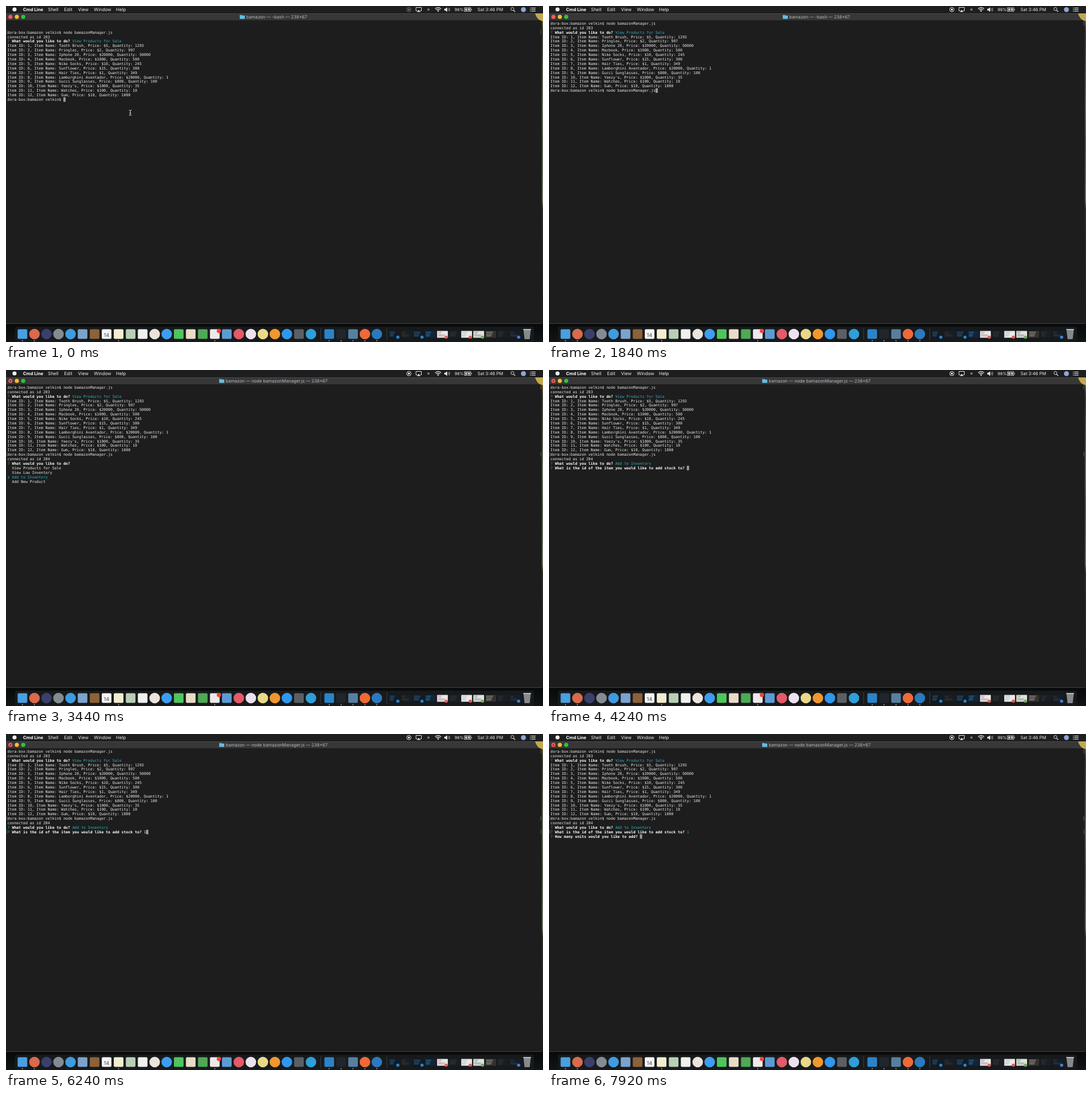
Animation, 947 px wide and 592 px high, one loop 8000 ms. Source, as an HTML page with a canvas:

```html
<!DOCTYPE html>
<html lang="en">
<head>
<meta charset="utf-8">
<title>Inventory manager session</title>
<style>
html, body { margin: 0; width: 100%; height: 100%; overflow: hidden; background: #0b0d0d; }
canvas { display: block; }
</style>
</head>
<body>
<canvas id="stage" width="947" height="592"></canvas>
<script>
const ctx = document.getElementById('stage').getContext('2d');
ctx.textRendering = 'geometricPrecision';

const LOOP = 8000;
const UI = 'Inter, sans-serif';
const MONO = '"DejaVu Sans Mono", monospace';
const LEFT = 2.6, FIRST_BASELINE = 32.9, PITCH = 7.89, FONT_SIZE = 6.55;
const WHITE = '#eeeeee', CYAN = '#2fb4c4', GREEN = '#35b544', GREY = '#9a9a9a';

// Moments of the session, in ms
const AT = {
  record: 80, recall: 320, thumbFade: 960, thumbGone: 1280, run: 2160,
  connect: 2400, list: 2480, down1: 2960, down2: 3200, choose: 3840,
  typeId: 5440, enterId: 7040
};

const PROMPT = 'dora-box:bamazon velkin$ ';
const COMMAND = 'node bamazonManager.js';
const CHOICES = ['View Products for Sale', 'View Low Inventory', 'Add to Inventory', 'Add New Product'];
const PRODUCTS = [
  ['Tooth Brush', 5, 1293], ['Pringles', 2, 997], ['Iphone 20', 20000, 50000],
  ['Macbook', 1000, 500], ['Nike Socks', 10, 245], ['Sunflower', 15, 300],
  ['Hair Ties', 1, 349], ['Lamborghini Aventador', 20000, 1], ['Gucci Sunglasses', 800, 100],
  ["Yeezy's", 1000, 35], ['Watches', 100, 10], ['Gum', 10, 1000]
];

const plain = text => ({ text, color: WHITE });
const cyan = text => ({ text, color: CYAN });
const question = text => [{ text: '? ', color: GREEN }, { text: text + ' ', color: '#ffffff', bold: true }];

const HISTORY = [
  [plain(PROMPT + COMMAND)],
  [plain('connected as id 203')],
  [...question('What would you like to do?'), cyan(CHOICES[0])],
  ...PRODUCTS.map(([name, price, count], i) =>
    [plain(`Item ID: ${i + 1}, Item Name: ${name}, Price: $${price}, Quantity: ${count}`)])
];

// Console rows at time t; cursor tells whether a block follows the last row
function session(t) {
  const rows = [...HISTORY];
  if (t < AT.run) {
    rows.push([plain(PROMPT + (t < AT.recall ? '' : COMMAND))]);
    return { rows, cursor: true };
  }
  rows.push([plain(PROMPT + COMMAND)]);
  if (t < AT.connect) return { rows: [...rows, []], cursor: true };
  rows.push([plain('connected as id 204')]);
  if (t < AT.list) return { rows: [...rows, []], cursor: true };
  const ask = question('What would you like to do?');
  if (t < AT.choose) {
    const selected = (t >= AT.down1) + (t >= AT.down2);
    rows.push(ask, ...CHOICES.map((c, i) => [i === selected ? cyan('❯ ' + c) : plain('  ' + c)]));
    return { rows, cursor: false };
  }
  rows.push([...ask, cyan(CHOICES[2])]);
  const idRow = question('What is the id of the item you would like to add stock to?');
  if (t >= AT.enterId) rows.push([...idRow, cyan('1')], question('How many units would you like to add?'));
  else rows.push(t >= AT.typeId ? [...idRow, plain('1')] : idRow);
  return { rows, cursor: true };
}

function rect(x, y, w, h, color, radius = 0) {
  ctx.fillStyle = color;
  ctx.beginPath();
  ctx.roundRect(x, y, w, h, radius);
  ctx.fill();
}

function dot(x, y, r, color) {
  ctx.fillStyle = color;
  ctx.beginPath();
  ctx.arc(x, y, r, 0, 7);
  ctx.fill();
}

function stroke(path, color = '#e6e6e6', width = 1) {
  ctx.strokeStyle = color;
  ctx.lineWidth = width;
  ctx.stroke(new Path2D(path));
}

function label(text, x, y, size, color = '#f0f0f0', weight = 400, align = 'left') {
  ctx.font = `${weight} ${size}px ${UI}`;
  ctx.textAlign = align;
  ctx.fillStyle = color;
  ctx.fillText(text, x, y);
}

function drawMenuBar(t) {
  rect(0, 0, 947, 13, '#1d1e1f');
  dot(15, 6, 3.6, '#f0f0f0');
  label('Cmd Line', 30, 9, 7.8, '#ffffff', 700);
  [['Shell', 74], ['Edit', 102.5], ['View', 127], ['Window', 155], ['Help', 194]]
    .forEach(([text, x]) => label(text, x, 9, 8));

  const record = t < AT.record ? '#777777' : '#f0f0f0';
  ctx.strokeStyle = record;
  ctx.lineWidth = 1;
  ctx.beginPath();
  ctx.arc(710.5, 6.3, 3.8, 0, 7);
  ctx.stroke();
  rect(709, 4.8, 3, 3, record);

  stroke('M725 8.5H723V2.5H732.5V8.5H730.5');
  ctx.fillStyle = '#e6e6e6';
  ctx.fill(new Path2D('M724.5 10.5L727.8 6.8L731 10.5Z'));
  dot(745, 6.3, 2, '#808080');
  stroke('M756.7 5Q762 .4 767.3 5M758.6 7Q762 4 765.4 7', '#e6e6e6', 1.2);
  dot(762, 8.8, 1.3, '#e6e6e6');
  ctx.fill(new Path2D('M773 4.7H775L778 2.2V10.4L775 8H773Z'));
  stroke('M779.5 4.4Q781 6.3 779.5 8.2M781.4 3Q784 6.3 781.4 9.6', '#e6e6e6', .8);
  label('98%', 791, 9, 7.3);
  stroke('M808.5 3H819.5V9.5H808.5ZM821 5V7.6', '#dddddd', .9);
  rect(810, 4.4, 8, 3.8, '#dddddd');
  stroke('M815 3L812.5 6.6H815.5L813.5 9.8', '#1d1e1f', .9);
  label('Sat 3:46 PM', 831.5, 9, 7.8);
  ctx.strokeStyle = '#e6e6e6';
  ctx.beginPath();
  ctx.arc(893, 5.3, 2.7, 0, 7);
  ctx.stroke();
  stroke('M895 7.4L898 10.2', '#e6e6e6', 1.2);
  dot(912.5, 6.3, 4.4, '#8fa6d6');
  [3.5, 6.3, 9.1].forEach(y => {
    rect(924, y - .5, 1.2, 1.1, '#e6e6e6');
    rect(926.3, y - .5, 7.5, 1.1, '#e6e6e6');
  });
}

function drawWindow(t) {
  const running = t >= AT.run;
  rect(0, 13, 945, 547, '#1d1d1d');
  rect(0, 13, 945, 13, '#373738');
  rect(0, 13, 945, .7, '#505052');
  rect(0, 25.5, 945, .7, '#111111');
  rect(0, 559.3, 945, .8, '#4c4c4c');

  // Wallpaper showing past the right edge
  const edge = ctx.createLinearGradient(0, 13, 0, 560);
  [[0, '#8b7c3d'], [.06, '#3a3b34'], [.3, '#66705f'], [.42, '#535d4c'], [.6, '#6b7563'], [.63, '#2b3029'], [1, '#1c201d']]
    .forEach(([p, c]) => edge.addColorStop(p, c));
  rect(945, 13, 2, 547, edge);
  ctx.fillStyle = '#c2a94f';
  ctx.fill(new Path2D('M933 13H947V27Q936 25 933 13Z'));

  ['#ff5b53', '#fdbc2f', '#2ac53e'].forEach((color, i) => dot(7.8 + i * 11.3, 19.2, 3.6, color));
  if (running) dot(7.8, 19.2, 1.2, '#79150f');

  const title = `bamazon — ${running ? COMMAND : '-bash'} — 238×67`;
  label(title, 477.3, 22, 7.7, '#b9b9ba', 400, 'center');
  const x = 477.3 - ctx.measureText(title).width / 2 - 11.5;
  rect(x, 15.8, 4.5, 3, '#55a9d0', .7);
  rect(x, 16.8, 9, 6, '#65bde4', .7);
}

function drawConsole(t) {
  const { rows, cursor } = session(t);
  const offset = t < AT.recall ? 2 * PITCH : 0;
  const baseline = i => FIRST_BASELINE + offset + i * PITCH;
  ctx.textAlign = 'left';
  let x;
  rows.forEach((row, i) => {
    x = LEFT;
    for (const { text, color, bold } of row) {
      ctx.font = `${bold ? 700 : 400} ${FONT_SIZE}px ${MONO}`;
      ctx.fillStyle = color;
      ctx.fillText(text, x, baseline(i));
      x += ctx.measureText(text).width;
    }
  });
  if (cursor) rect(x, baseline(rows.length - 1) - 6.2, 4, 7.9, GREY);

  // Prompt marks in the margins
  const mark = (row, side) => {
    const y = baseline(row) - 5.5;
    stroke(side ? `M942 ${y}h1.2v6h-1.2` : `M2.2 ${y}h-1v6h1`, '#777777', .7);
  };
  mark(0, 1);
  if (t < AT.recall) mark(0, 0);
  if (t >= AT.run) { mark(15, 0); mark(15, 1); }
  if (t >= AT.typeId) { mark(18, 0); mark(18, 1); }

  if (t < AT.recall) {
    stroke('M216.8 183.5Q219.2 183.5 219.2 185V191Q219.2 192.5 216.8 192.5M221.6 183.5Q219.2 183.5 219.2 185M219.2 191Q219.2 192.5 221.6 192.5M217.8 188.5H220.6', '#d8d8d8', 1);
  } else if (t < AT.thumbGone) {
    ctx.globalAlpha = Math.min(1, (AT.thumbGone - t) / (AT.thumbGone - AT.thumbFade));
    rect(939.5, 546, 4, 13, '#9a9a9a', 2);
    ctx.globalAlpha = 1;
  }
}

// o: circle, s: square; colour follows
const APPS = ('s4a9fe0 oda6a4c o39406b o858b91 o3f9be0 s7ba3cc s8d6238 sf4f4f4 sf3edcf sb8cfb5 sf0f0ee oece4da ' +
  'o3d9df0 s4fc55c se8dcc8 s4fa955 sefe9ec s5b9bd4 oe45a68 oece2ee oe8d98a of0972f o2f97ee s5c6064 o2f9fd8').split(' ');
const TOOLS = ('s2b83c9 s20262b s587f9f oee6a38 o2c79bd').split(' ');

function drawIcon(spec, x) {
  const color = '#' + spec.slice(1);
  if (spec[0] === 'o') dot(x, 578, 9.3, color);
  else rect(x - 8.5, 569.5, 17, 17, color, 2);
}

function drawThumbnail(x, [paper, badge, lines]) {
  rect(x - 9.5, 572.5, 19, 12, paper, .5);
  for (let i = 0; lines && i < 4; i++) rect(x - 8, 574.3 + i * 2.3, 5 + (i * 7 + x) % 8, .7, lines);
  if (badge) dot(x + 6.5, 583.5, 2.8, badge);
}

function drawDock() {
  const back = ctx.createLinearGradient(0, 560, 0, 592);
  back.addColorStop(0, '#080a0a');
  back.addColorStop(1, '#111515');
  rect(0, 560, 947, 32, back);
  rect(16, 565, 915, 27, '#171a1c', 3);

  APPS.forEach((spec, i) => drawIcon(spec, 29 + i * 21.2));
  label('14', 177.3, 582.5, 9, '#444444', 400, 'center');
  dot(375.5, 572.5, 3.8, '#f0443c');
  TOOLS.forEach((spec, i) => drawIcon(spec, 570 + i * 21));
  [554.5, 671].forEach(x => rect(x, 568, .8, 20, '#484c4e'));

  const code = ['#101b27', '#2b83c9', '#3f78a8'];
  const shell = ['#1b1e21', '', '#3a4148'];
  const page = ['#e9e9e9', '#e35b47', '#a8b0b8'];
  [code, shell, code, ['#10253b', '', '#3a8fd0'], ['#e8eaea', '#dc6655', '#b06a78'], shell, page,
    ['#dfe3dc', '#76a866', '#6d7770'], ['#35322e', '', '#c8c4ba'], shell, ['#161d26', '#3f83d8', '#33475a']]
    .forEach((thumb, i) => drawThumbnail(684.5 + i * 21.3, thumb));

  ctx.fillStyle = '#858a8c';
  ctx.fill(new Path2D('M912.5 570H925.5L923.5 587H914.5Z'));
  rect(912, 569, 14, 2, '#b8bcbd', 1);
  [29, 50, 198.6, 368.2, 570, 591, 612, 633, 654].forEach(x => dot(x, 589.7, .9, '#c8c8c8'));
}

function frame(now) {
  const t = now % LOOP;
  drawDock();
  drawWindow(t);
  drawMenuBar(t);
  drawConsole(t);
  requestAnimationFrame(frame);
}
requestAnimationFrame(frame);
</script>
</body>
</html>
```
